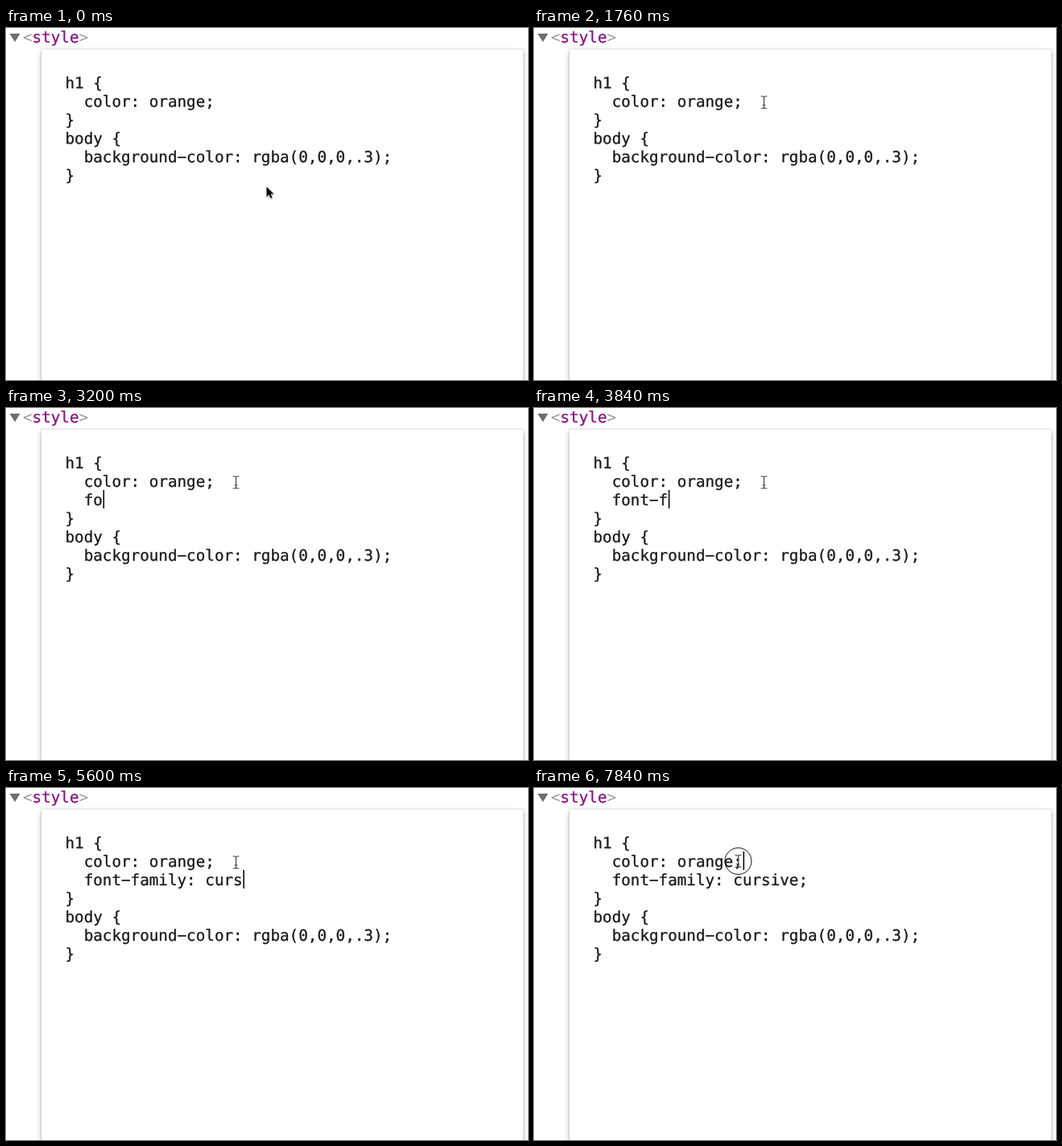
Write an HTML page that moves like this. It is 648x438 px and loops after 8000 ms.

```html
<!DOCTYPE html>
<html lang="en">
<head>
<meta charset="utf-8">
<style>
  html, body { margin: 0; width: 648px; height: 438px; overflow: hidden; background: #fff; }
  #panel {
    position: absolute; left: 44px; top: 27px; width: 598px; height: 411px; background: #fff;
    box-shadow: 0 0 0 1.5px rgba(0,0,0,.05), 0 3px 6px rgba(0,0,0,.2), 0 3px 9px rgba(0,0,0,.1);
  }
  svg { position: absolute; left: 0; top: 0; }
  text {
    font: 19.25px "DejaVu Sans Mono", monospace; fill: #1a1a1a; stroke: #1a1a1a; stroke-width: .3;
    white-space: pre; text-rendering: geometricPrecision;
  }
  .bracket { fill: #a894a6; stroke: none; }
  .tag { fill: #881280; stroke: #881280; }
</style>
</head>
<body>
<div id="panel"></div>
<svg width="648" height="438">
  <path d="M4.5 7h13l-6.5 10.5z" fill="#6e6e6e"/>
  <text x="21" y="18"><tspan class="bracket">&lt;</tspan><tspan class="tag">style</tspan><tspan class="bracket">&gt;</tspan></text>
  <g id="code"></g>
  <rect id="caret" width="1.5" height="23"/>
  <path id="arrow" d="M0 0V12.5L3 9.800L5 14.300L7 13.400L5 9H9Z" stroke="#fff" paint-order="stroke"
    style="filter:drop-shadow(0 1px 1px rgba(0,0,0,.35))"/>
  <path id="beam" fill="none" stroke="#444" stroke-width="1.2"
    d="M-4-7.5h2.5q1.5 0 1.5 1.5v12q0 1.5-1.5 1.5h-2.5M4-7.5h-2.5q-1.5 0-1.5 1.5M0 6q0 1.5 1.5 1.5h2.5M-2 3.5h4"/>
  <circle id="ring" r="16.5" fill="none" stroke="#111"/>
</svg>
<script>
const LOOP = 8000, STEP = 160, BLINK = 480;
const LEFT = 51, TOP = 56, CHAR = 11.589, LINE = 23;
const ENTER = 1920, CLICKS = [1120, 7840];
const CODE = ['  h1 {', '    color: orange;', '  }', '  body {', '    background-color: rgba(0,0,0,.3);', '  }'];

// Text typed evenly between the first and last keystroke.
const bursts = [
  { text: 'font-', start: 3040, end: 3520 },
  { text: 'f', start: 3840, end: 3840 },
  { text: 'amily:', start: 4160, end: 4960 },
  { text: ' cursive', start: 5120, end: 6080 },
  { text: ';', start: 6400, end: 6400 }
];

// Each jump restarts the blinking.
const caretJumps = [
  { time: 800, row: 4, col: 4 },
  { time: CLICKS[0], row: 1, col: 18 },
  { time: CLICKS[0] + STEP, row: 1, col: 18 },
  { time: ENTER, row: 2, col: 0 },
  { time: 2720, row: 2, col: 4 },
  { time: CLICKS[1], row: 1, col: 18 }
];

const glides = [
  { start: 0, end: 480, x: 293.5, y: 107.5 },
  { start: 640, end: 960, x: 285.5, y: 92.5 },
  { start: 7040, end: 7680, x: 253.5, y: 91 }
];

const $ = id => document.getElementById(id);
const show = (id, on) => $(id).setAttribute('visibility', on ? 'visible' : 'hidden');
const move = (id, x, y) => $(id).setAttribute('transform', `translate(${x} ${y})`);
const progress = (t, { start, end }) => Math.max(0, Math.min(1, (t - start) / (end - start || 1)));
const ease = p => p * p * (3 - 2 * p);

const lines = Array.from({ length: CODE.length + 1 }, (_, row) => {
  const line = document.createElementNS('http://www.w3.org/2000/svg', 'text');
  line.setAttribute('y', TOP + 18.6 + row * LINE);
  return $('code').appendChild(line);
});

function setLine(line, content = '') {
  // The minus sign gives the wide hyphen of the editor font.
  const body = content.trimStart().replaceAll('-', '\u2212');
  line.setAttribute('x', LEFT - 0.7 + (content.length - body.length) * CHAR);
  if (line.textContent !== body) line.textContent = body;
}

function drawCaret(t, typed, started) {
  const jump = caretJumps.findLast(({ time }) => time <= t);
  show('caret', false);
  if (!jump) return;
  const lastKey = started.length ? Math.min(t, started.at(-1).end) : 0;
  const idle = t - Math.max(jump.time, lastKey);
  const col = jump.col + (jump.row === 2 ? typed.length : 0);
  show('caret', Math.floor(idle / BLINK) % 2 === 0);
  move('caret', LEFT + col * CHAR, TOP + jump.row * LINE);
}

function drawPointer(t) {
  let x = 323.5, y = 197.5;
  for (const glide of glides) {
    const p = ease(progress(t, glide));
    x += (glide.x - x) * p;
    y += (glide.y - y) * p;
  }
  for (const id of ['arrow', 'beam', 'ring']) move(id, x, y);
  show('arrow', y > 150);
  show('beam', y <= 150);
  show('ring', CLICKS.includes(t));
}

function draw(now) {
  const t = Math.floor(now % LOOP / STEP) * STEP;
  const started = bursts.filter(({ start }) => start <= t);
  const typed = started.map(burst =>
    burst.text.slice(0, Math.round(1 + (burst.text.length - 1) * progress(t, burst)))).join('');
  const code = [...CODE];
  if (t >= ENTER) code.splice(2, 0, '    ' + typed);
  lines.forEach((line, row) => setLine(line, code[row]));
  drawCaret(t, typed, started);
  drawPointer(t);
  requestAnimationFrame(draw);
}
requestAnimationFrame(draw);
</script>
</body>
</html>
```
